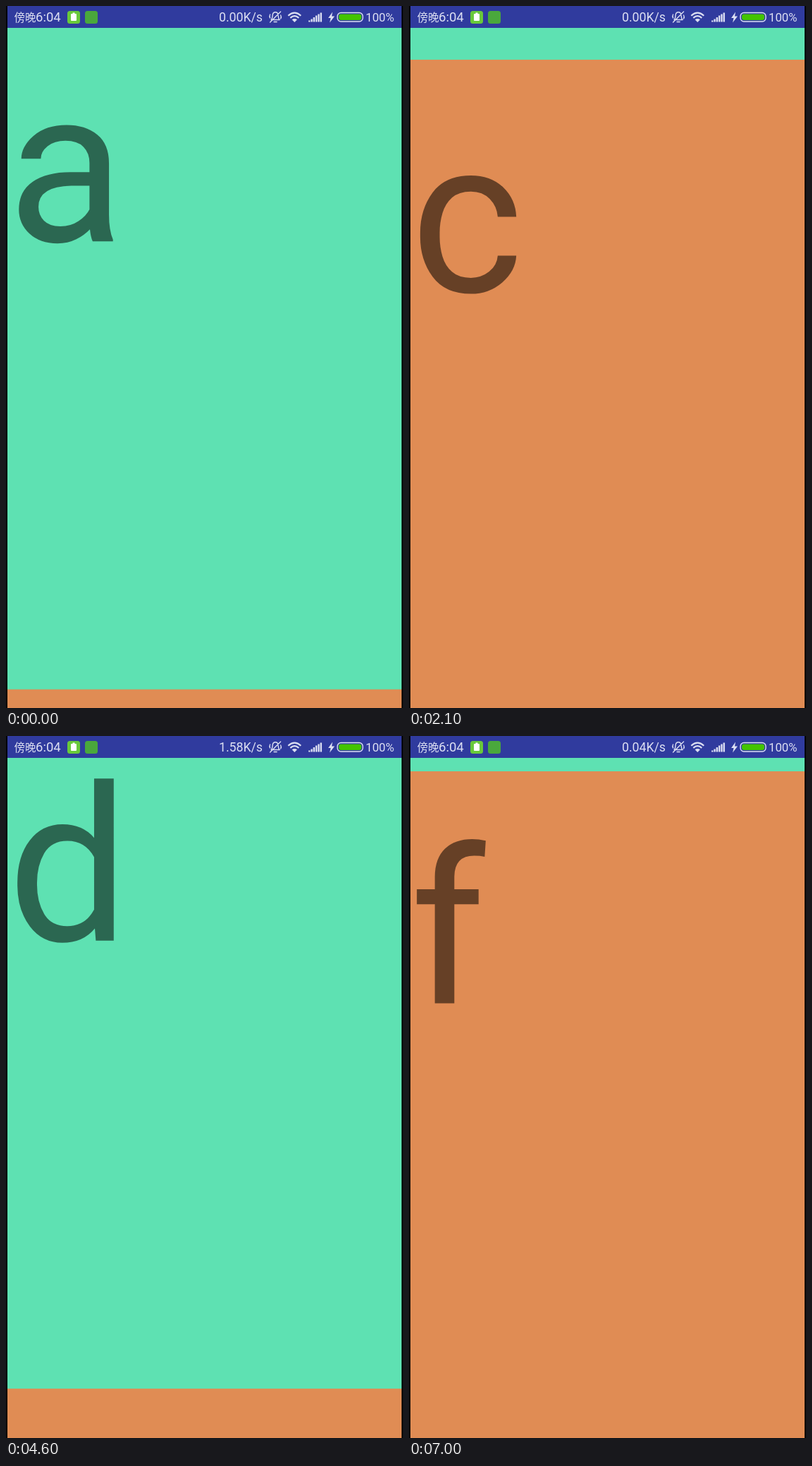
These frames come from a looping animation (563x994 px, 7.1 s). An HTML page:

```html
<!DOCTYPE html>
<html lang="zh">
<head>
<meta charset="utf-8">
<title>Vertical pager</title>
<style>
  html, body { margin: 0; width: 100%; height: 100%; overflow: hidden; background: #000; }
  svg { display: block; width: 100%; height: 100%; }
  text { font-family: Roboto, sans-serif; }
  .letter { font-size: 306px; fill: #000; fill-opacity: .54; }
  .status text { fill: #dcdff2; }
  .status .cjk { font-family: "Noto Sans CJK SC", "Noto Sans CJK", sans-serif; }
  .line { fill: none; stroke: #dcdff2; stroke-width: 1.4; stroke-linecap: round; stroke-linejoin: round; }
  .wifi { stroke-width: 2.2; stroke-linecap: butt; }
  .solid { fill: #dcdff2; }
</style>
</head>
<body>
<svg viewBox="0 0 563 994">
  <rect width="563" height="994"/>
  <rect x="2" width="559" height="994" fill="#e08c54"/>
  <g id="other">
    <text class="letter" x="2" y="328.6"></text>
  </g>
  <g id="current">
    <rect x="2" width="559" height="963" fill="#5ee1b2"/>
    <text class="letter" x="2" y="328.6"></text>
  </g>
  <g class="status">
    <rect x="2" width="559" height="31" fill="#303b9e"/>
    <text class="cjk" x="11.5" y="22" font-size="15.5">傍晚</text>
    <text x="42" y="22.3" font-size="18.5">6:04</text>
    <rect x="87" y="7" width="18" height="18" rx="3.5" fill="#69c93a"/>
    <path d="M93 11h1.5v-1.5h3V11H99q1 0 1 1v8q0 1-1 1h-6q-1 0-1-1v-8q0-1 1-1z" fill="#fff"/>
    <rect x="112" y="7" width="18" height="18" rx="3.5" fill="#4aa83c"/>
    <text id="speed" x="364" y="22.3" font-size="17.7" text-anchor="end"></text>
    <g class="line">
      <path d="M376 19.5c2-1.5 1.7-3.500 2-6.500c.3-3 2-4.200 4-4.200s3.700 1.200 4 4.200c.3 3 0 5 2 6.500zM380 22.500h4M389.500 8L374.500 23"/>
      <path d="M374.500 12q-1.500 2.500 0 5M389.500 13q1.500 2.500 0 5"/>
    </g>
    <path class="line wifi" d="M400.2 13.7q9-8 18 0M403.2 16.800q6-5.200 12 0"/>
    <path class="solid" d="M405.500 19.300q3.700-2.800 7.400 0L409.200 23z"/>
    <g id="bars" class="solid"></g>
    <path class="solid" d="M463 8.500l-6 8.500h3.500l-1.500 6.500 7-9h-4z"/>
    <rect class="line" x="470" y="9.500" width="36" height="12.500" rx="5"/>
    <rect x="472" y="11.500" width="32" height="8.500" rx="3" fill="#43c400"/>
    <text x="510" y="22.2" font-size="16.800">100%</text>
  </g>
</svg>
<script>
const LOOP = 7100, STEP = 100, TOP = 31, HEIGHT = 963;
const LETTERS = 'abcdef';

// Page turns: start, duration, easing exponents for the two ends.
const flips = [
  { at: -100, dur: 1400, a: 1.386, b: 1.2 },
  { at: 1600, dur: 600, a: 1.9, b: 1.876 },
  { at: 2500, dur: 600, a: 1.9, b: 1.876 },
  { at: 5800, dur: 500, a: 1.9, b: 1.9 },
  { at: 6500, dur: 600, a: 1.9, b: 2.373 }
];

// Short drags that spring back: start, duration, peak scroll, skew.
const tugs = [
  { at: 3300, dur: 600, peak: -120, skew: 1 },
  { at: 4200, dur: 500, peak: 94, skew: 1.39 },
  { at: 5000, dur: 400, peak: -117, skew: 1 }
];

const $ = id => document.getElementById(id);
const current = $('current'), other = $('other'), speed = $('speed');

const active = (list, t) => list.find(m => t > m.at && t < m.at + m.dur);
const phase = (m, t) => (t - m.at) / m.dur;

function scrollAt(t) {
  const flip = active(flips, t);
  if (flip) {
    const u = phase(flip, t), p = u ** flip.a, q = (1 - u) ** flip.b;
    return HEIGHT * p / (p + q);
  }
  const tug = active(tugs, t);
  return tug ? tug.peak * Math.sin(Math.PI * phase(tug, t) ** tug.skew) : 0;
}

function place(page, y, letter) {
  page.setAttribute('transform', `translate(0 ${y.toFixed(2)})`);
  page.lastElementChild.textContent = letter || '';
}

function draw(t) {
  const scroll = scrollAt(t);
  const index = flips.filter(f => t >= f.at + f.dur).length;
  const side = scroll < 0 ? -1 : 1;
  const y = TOP - scroll;
  place(current, y, LETTERS[index]);
  place(other, y + side * HEIGHT, LETTERS[index + side]);
  speed.textContent = (t < 2800 ? '0.00' : t < 6800 ? '1.58' : '0.04') + 'K/s';
}

$('bars').innerHTML = [2, 4, 6.5, 9, 11, 13].map((h, i) =>
  `<rect x="${429 + i * 3.3}" y="${22.5 - h}" width="2.4" height="${h}"/>`).join('');

const begin = performance.now();
function tick() {
  const t = (performance.now() - begin) % LOOP;
  draw(Math.floor(t / STEP) * STEP);
  requestAnimationFrame(tick);
}
tick();
</script>
</body>
</html>
```
